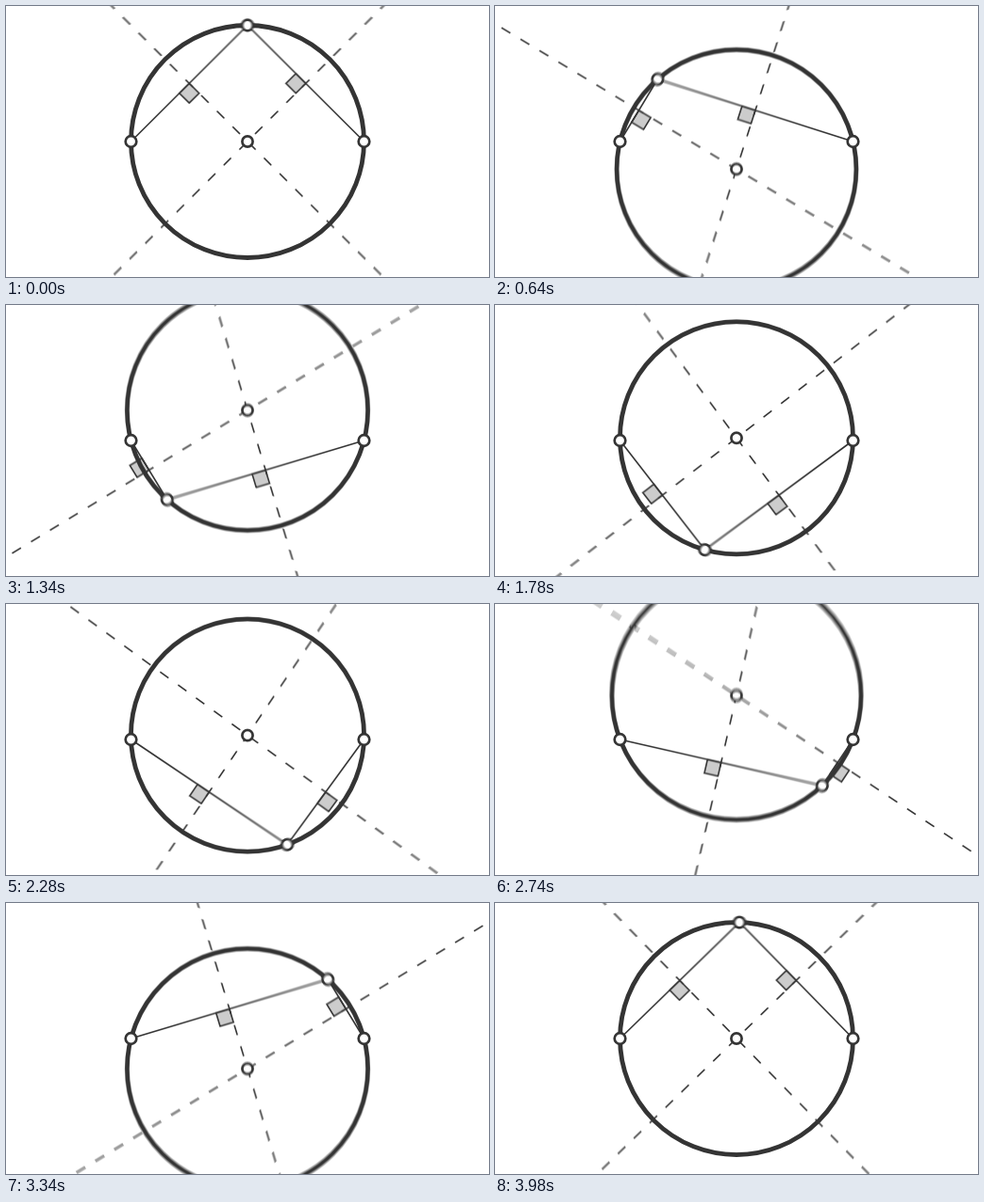
An HTML page with a canvas for the animation above (4 s loop, 512 by 288 pixels).

```html
<!DOCTYPE html>
<html lang="en">
<head>
<meta charset="utf-8">
<title>Circle through three points</title>
<style>
  html, body { margin: 0; width: 100%; height: 100%; overflow: hidden; background: #fff; }
  canvas { display: block; width: 512px; height: 288px; }
</style>
</head>
<body>
<canvas id="stage" width="512" height="288"></canvas>
<script>
const W = 512, H = 288, LOOP = 4000, STEP = 20, SAMPLES = 16;
const CX = 256, CY = 144, HALF = 123.5, SWING = 99;
const DASH = 11, GAP = 12.5, SIDE = 14.8;
const INK = '#343234', SHADE = '#cccccc';

const stage = document.getElementById('stage').getContext('2d');
const scratch = document.createElement('canvas');
scratch.width = W;
scratch.height = H;
const ctx = scratch.getContext('2d', { willReadFrequently: true });
const sums = new Uint16Array(W * H);
const picture = stage.createImageData(W, H);

function stroke(width) {
  ctx.lineWidth = width;
  ctx.strokeStyle = INK;
  ctx.stroke();
}

// Frame of reference at a chord's midpoint: d runs along it, n across it.
function chord(a, b) {
  const len = Math.hypot(b.x - a.x, b.y - a.y);
  const dx = (b.x - a.x) / len, dy = (b.y - a.y) / len;
  return { a, b, x: (a.x + b.x) / 2, y: (a.y + b.y) / 2, dx, dy, nx: -dy, ny: dx };
}

function drawSquare({ x, y, dx, dy, nx, ny }) {
  const s = SIDE;
  ctx.beginPath();
  ctx.moveTo(x, y);
  ctx.lineTo(x - s * dx, y - s * dy);
  ctx.lineTo(x + s * (nx - dx), y + s * (ny - dy));
  ctx.lineTo(x + s * nx, y + s * ny);
  ctx.closePath();
  ctx.fillStyle = SHADE;
  ctx.fill();
  stroke(1.6);
}

function drawBisector({ x, y, nx, ny }) {
  ctx.setLineDash([DASH, GAP]);
  ctx.lineDashOffset = DASH / 2;
  for (const r of [700, -700]) {
    ctx.beginPath();
    ctx.moveTo(x, y);
    ctx.lineTo(x + r * nx, y + r * ny);
    stroke(1.6);
  }
  ctx.setLineDash([]);
}

function drawChord({ a, b }) {
  ctx.beginPath();
  ctx.moveTo(a.x, a.y);
  ctx.lineTo(b.x, b.y);
  stroke(1.6);
}

// c is the signed distance of the centre below the fixed points.
function drawCircle(c) {
  const r = Math.hypot(c, HALF);
  ctx.beginPath();
  if (r < 1500) {
    ctx.arc(CX, CY + c, r, 0, 2 * Math.PI);
  } else {
    // Nearly flat: follow the visible arc only
    for (let u = -272; u <= 272; u += 8) {
      const sag = (u * u - HALF * HALF) / (c + Math.sign(c) * Math.sqrt(r * r - u * u));
      ctx.lineTo(CX + u, CY + sag);
    }
  }
  stroke(4.8);
}

function drawDot(x, y, r) {
  ctx.beginPath();
  ctx.arc(x, y, r, 0, 2 * Math.PI);
  ctx.fillStyle = '#fff';
  ctx.fill();
  stroke(2.7);
}

function drawScene(ms) {
  const angle = 2 * Math.PI * ms / LOOP;
  const px = -SWING * Math.sin(angle);
  const rise = HALF * Math.cos(angle) || 1e-4;
  const c = (HALF * HALF - px * px - rise * rise) / (2 * rise);
  const a = { x: CX - HALF, y: CY };
  const b = { x: CX + HALF, y: CY };
  const p = { x: CX + px, y: CY - rise };
  const chords = [chord(a, p), chord(p, b)];

  ctx.fillStyle = '#fff';
  ctx.fillRect(0, 0, W, H);
  chords.forEach(drawSquare);
  chords.forEach(drawBisector);
  chords.forEach(drawChord);
  drawCircle(c);
  if (Math.abs(c) < 400) drawDot(CX, CY + c, 5.6);
  for (const q of [a, b, p]) drawDot(q.x, q.y, 5.8);
}

// Motion blur: average evenly spaced moments across one step.
function render(ms) {
  sums.fill(0);
  for (let k = 0; k < SAMPLES; k++) {
    drawScene(ms + STEP * ((k + 0.5) / SAMPLES - 0.5));
    const px = ctx.getImageData(0, 0, W, H).data;
    for (let i = 0; i < sums.length; i++) sums[i] += px[4 * i];
  }
  const out = picture.data;
  for (let i = 0; i < sums.length; i++) {
    const o = 4 * i;
    out[o] = out[o + 1] = out[o + 2] = sums[i] / SAMPLES;
    out[o + 3] = 255;
  }
  stage.putImageData(picture, 0, 0);
}

const start = performance.now();
let shown = -1;

function tick() {
  const elapsed = (performance.now() - start) % LOOP;
  const step = Math.floor(elapsed / STEP);
  if (step !== shown) {
    shown = step;
    render(step * STEP);
  }
  requestAnimationFrame(tick);
}
tick();
</script>
</body>
</html>
```
